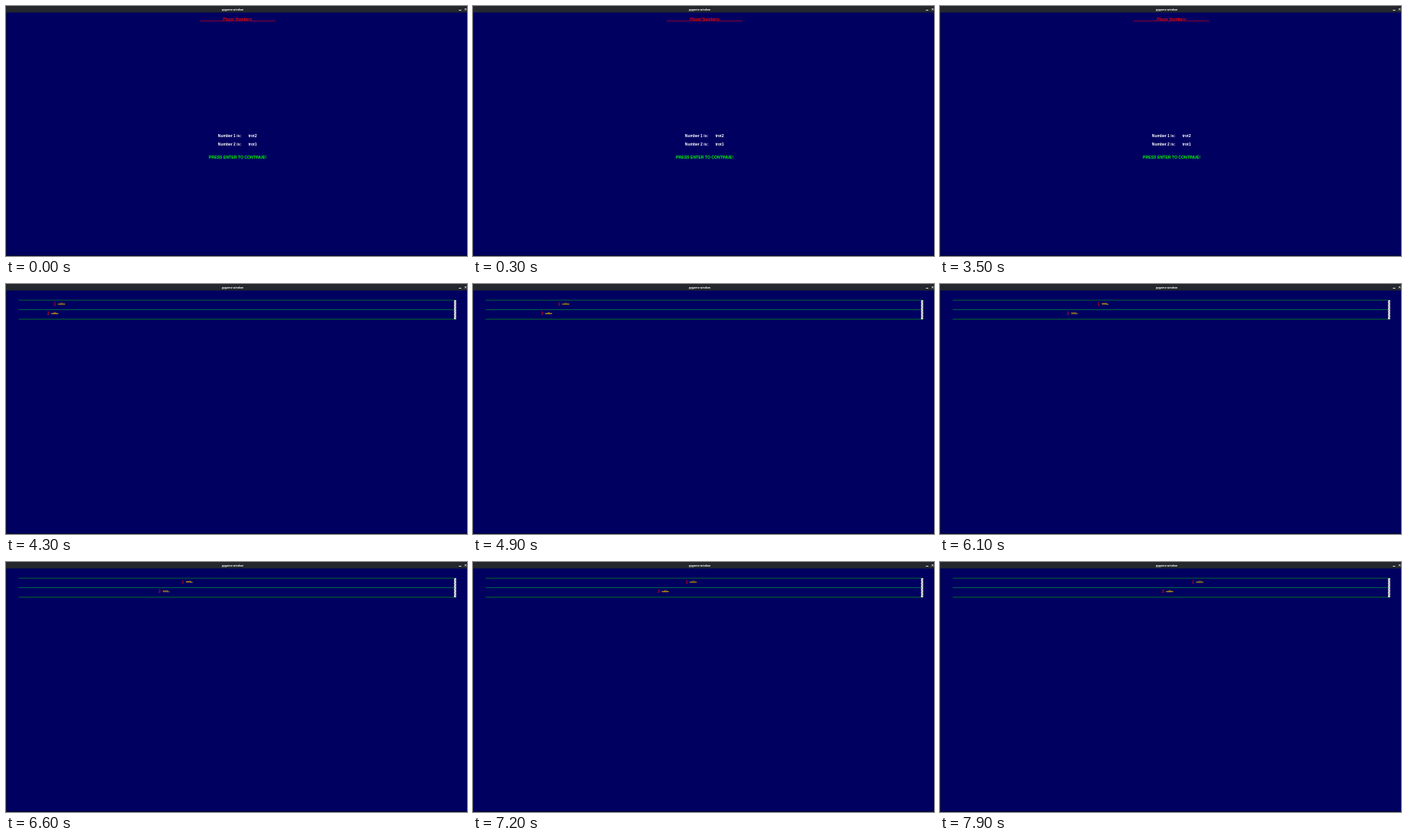
An HTML page with a canvas that plays this animation: 600 by 326 pixels, repeating every 8000 ms.

```html
<!DOCTYPE html>
<html lang="en">
<head>
<meta charset="utf-8">
<title>Race</title>
<style>
html, body { margin: 0; width: 100%; height: 100%; overflow: hidden; background: #000060; }
canvas { display: block; }
</style>
</head>
<body>
<canvas id="stage" width="600" height="326"></canvas>
<script>
const ctx = document.getElementById('stage').getContext('2d');
const LOOP = 8000, STEP = 100, RACE_START = 3600;
const SANS = '"Liberation Sans", Arial, sans-serif';
const LANES = [
  { label: '1', y: 26, path: [[3600, 12], [4300, 62.3], [5200, 135], [5500, 156], [6100, 205], [6600, 228.7], [7000, 262], [7900, 328]] },
  { label: '2', y: 38.3, path: [[3600, 12], [4300, 53.5], [5200, 106], [5500, 125], [6600, 198.5], [7900, 289]] }
];

function rect(x, y, w, h, color) {
  ctx.fillStyle = color;
  ctx.fillRect(x, y, w, h);
}

// Tiny type is set large and scaled down so the glyph spacing stays exact.
function text(str, x, y, size, color, align = 'left', family = SANS) {
  ctx.save();
  ctx.translate(x, y);
  ctx.scale(0.1, 0.1);
  ctx.font = `bold ${size * 10}px ${family}`;
  ctx.textAlign = align;
  ctx.fillStyle = color;
  ctx.fillText(str, 0, 0);
  ctx.restore();
}

function stroke(points, color, width) {
  ctx.beginPath();
  for (const [x, y] of points) ctx.lineTo(x, y);
  ctx.strokeStyle = color;
  ctx.lineWidth = width;
  ctx.stroke();
}

function valueAt(path, t) {
  let i = 1;
  while (i < path.length - 1 && path[i][0] < t) i++;
  const [t0, x0] = path[i - 1], [t1, x1] = path[i];
  return x0 + (x1 - x0) * (t - t0) / (t1 - t0);
}

function drawWindow() {
  rect(0, 0, 600, 326, '#000060');
  rect(0, 8, 0.7, 318, '#15182c');
  rect(0, 325, 600, 1, '#0a0c30');
  rect(0, 0, 600, 8.4, '#24282c');
  text('pygame window', 295, 5.5, 3.45, '#f4f4f4', 'center', '"Noto Sans", sans-serif');
  rect(589.5, 5, 3, 1, '#e8e8e8');
  stroke([[597, 3], [599.4, 5.6]], '#e8e8e8', 0.8);
  stroke([[599.4, 3], [597, 5.6]], '#e8e8e8', 0.8);
}

function drawIntro() {
  text('Player Numbers', 301.2, 18.6, 5, '#f00000', 'center');
  rect(252, 19.3, 98.5, 0.7, '#c00018');
  text('Number 1 is:', 275.8, 170.5, 5, '#ffffff');
  text('trot2', 315.4, 170.5, 5, '#ffffff');
  text('Number 2 is:', 275.8, 181.8, 5, '#ffffff');
  text('trot1', 315.4, 181.8, 5, '#ffffff');
  text('PRESS ENTER TO CONTINUE!', 301.5, 199, 5.15, '#00ff00', 'center');
}

function drawRunner(x, y, stretched) {
  ctx.save();
  ctx.translate(x, y);
  const coat = '#b08a18';
  if (stretched) {
    stroke([[0, 0.2], [9.3, 0.2]], coat, 1.3);
    stroke([[3, -0.9], [6.5, -0.9]], '#8a6820', 1);
    stroke([[1, 1.1], [8, 1.1]], '#57431f', 0.6);
  } else {
    stroke([[0.3, -0.3], [7.2, -0.3]], coat, 1.3);
    stroke([[6.5, 0.5], [9, 0.5]], coat, 0.9);
    for (const leg of [1, 3.2, 5.4]) rect(leg, 0.1, 1, 1.1, '#a58522');
    rect(4, -1.4, 1.6, 0.7, '#80642a');
  }
  ctx.restore();
}

function drawTrack() {
  rect(16.5, 20.7, 569, 0.8, '#007a28');
  rect(16.5, 33.1, 569, 0.8, '#007a40');
  rect(16.5, 45.5, 569, 0.9, '#007a18');
  rect(583, 21, 3, 25, '#d4d4d8');
  for (let i = 0; i < 12; i++) {
    rect(583 + (i % 2) * 1.5, 21.5 + i * 2, 1.4, 1, '#77778a');
  }
}

function drawRace(t) {
  drawTrack();
  const stretched = (t / STEP) % 5 > 1;
  for (const lane of LANES) {
    const x = valueAt(lane.path, t);
    text(lane.label, x, lane.y + 1.7, 5, '#e00010');
    drawRunner(x + 5.3, lane.y, stretched);
  }
}

function frame(now) {
  const t = Math.floor((now % LOOP) / STEP) * STEP;
  drawWindow();
  if (t < RACE_START) drawIntro();
  else drawRace(t);
  requestAnimationFrame(frame);
}

const begin = performance.now();
(function tick() {
  frame = ((draw) => () => draw(performance.now() - begin))(frame);
  frame();
})();
</script>
</body>
</html>
```
